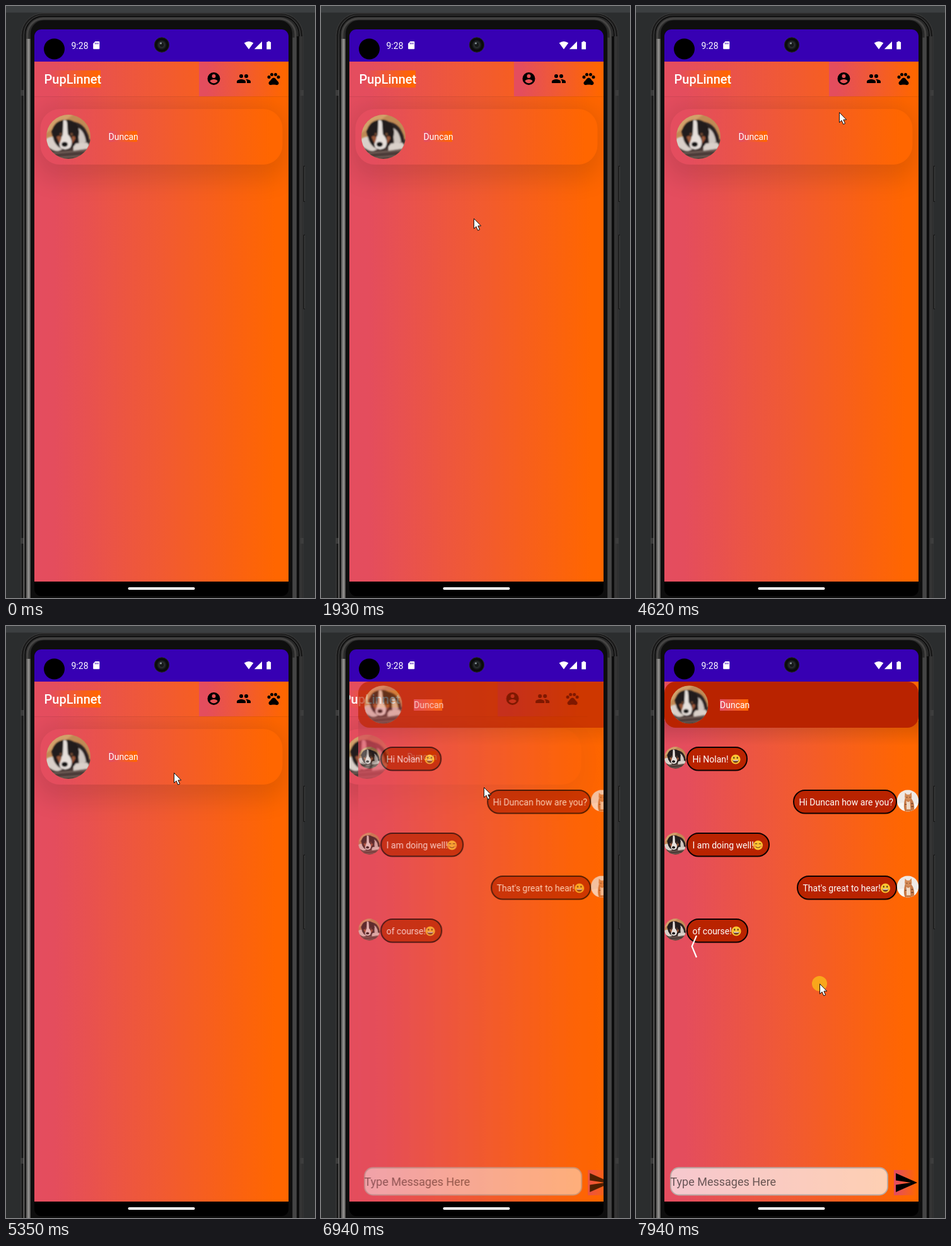
An HTML page that plays this animation: 490x937 px, repeating every 8000 ms.

```html
<!DOCTYPE html>
<html lang="en">
<head>
<meta charset="utf-8">
<title>Pet chat</title>
<style>
  html, body { margin: 0; width: 100%; height: 100%; overflow: hidden; background: #2b2d2e; }
  svg { display: block; width: 100vw; height: 100vh; }
  text { font: 14px Roboto, "Noto Sans", sans-serif; fill: #fff; }
  .title { font-size: 20px; font-weight: 500; }
  .hint { font-size: 18px; fill: rgba(0, 0, 0, .58); }
  .bubble { fill: #b92300; stroke: #0c0000; stroke-width: 2; }
  #list, #chat, #press, #back { animation: 8s linear infinite; }
  #list { animation-name: leave; }
  #chat { animation-name: enter, appear; }
  #press { animation-name: press; animation-timing-function: step-end; }
  #back { animation-name: back; animation-timing-function: step-end; }
  @keyframes leave {
    0%, 85.625% { transform: none; animation-timing-function: cubic-bezier(.3, 0, .8, .15); }
    86.5625% { transform: translateX(-16px); animation-timing-function: cubic-bezier(.05, .7, .1, 1); }
    91.25%, 100% { transform: translateX(-40px); }
  }
  @keyframes enter {
    0%, 85.625% { transform: translateX(40px); animation-timing-function: cubic-bezier(.3, 0, .8, .15); }
    86.5625% { transform: translateX(24px); animation-timing-function: cubic-bezier(.05, .7, .1, 1); }
    91.25%, 100% { transform: none; }
  }
  @keyframes appear {
    0%, 86% { opacity: 0; }
    87.1%, 100% { opacity: 1; }
  }
  @keyframes press {
    0%, 83.45% { opacity: 0; }
    82.57%, 94.15%, 100% { opacity: 1; }
  }
  @keyframes back {
    0% { opacity: 0; }
    96.82%, 100% { opacity: 1; }
  }
</style>
</head>
<body>
<svg viewBox="0 0 490 937" preserveAspectRatio="none">
  <defs>
    <linearGradient id="warm">
      <stop offset="0" stop-color="#e44d5f"/>
      <stop offset=".08" stop-color="#e44d5d"/>
      <stop offset=".5" stop-color="#f15a32"/>
      <stop offset=".95" stop-color="#ff6600"/>
    </linearGradient>
    <linearGradient id="metal" x2="0" y2="1">
      <stop offset="0" stop-color="#3c3c3c"/>
      <stop offset=".15" stop-color="#5c5c5c"/>
      <stop offset="1" stop-color="#8e8c8a"/>
    </linearGradient>
    <linearGradient id="rim">
      <stop offset="0" stop-color="#4c4b4a"/>
      <stop offset=".55" stop-color="#9a9896"/>
      <stop offset="1" stop-color="#4a4948"/>
    </linearGradient>
    <linearGradient id="drop" x2="0" y2="1">
      <stop offset="0" stop-opacity=".17"/>
      <stop offset="1" stop-opacity="0"/>
    </linearGradient>
    <radialGradient id="lens">
      <stop offset="0" stop-color="#50585a"/>
      <stop offset=".5" stop-color="#2c3032"/>
      <stop offset="1" stop-color="#0c0d0e"/>
    </radialGradient>
    <filter id="soft" x="-20%" y="-80%" width="140%" height="260%"><feGaussianBlur stdDeviation="19"/></filter>
    <filter id="photo"><feGaussianBlur stdDeviation="1"/></filter>
    <clipPath id="page"><rect x="45" y="88" width="403" height="823"/></clipPath>
    <clipPath id="glass"><rect x="45" y="37" width="403" height="897" rx="11"/></clipPath>
    <clipPath id="round"><circle r="35"/></clipPath>

    <g id="dog" clip-path="url(#round)">
      <rect x="-35" y="-35" width="70" height="70" fill="#c08a55"/>
      <g filter="url(#photo)">
        <path d="M-38 -38H12L-38 -4Z" fill="#d2a06a"/>
        <path d="M-38 10 38 4V38H-38Z" fill="#4c3b37"/>
        <path d="M-36 27 36 21M-30 34 35 29" stroke="#75625b" stroke-width="2"/>
        <path d="M2 -24Q22 -24 29 -8Q36 4 30 14H2Z" fill="#2c2322"/>
        <path d="M15 -14Q25 -10 28 8L17 14Z" fill="#cfc6c0"/>
        <path d="M-36 4Q-26 -4 -18 4L-8 18Q-16 25 -24 21L-36 14Z" fill="#d9d0c9"/>
        <path d="M8 11 29 9Q36 14 30 19L8 22Z" fill="#d9d0c9"/>
        <path d="M-27 -8Q-22 -27 -4 -27Q14 -27 17 -8Q16 14 -1 21Q-17 20 -23 6Z" fill="#241c1c"/>
        <path d="M-8 -26Q-2 -28 -2 -20L-1 -4Q9 6 3 17Q-5 23 -13 17Q-17 8 -9 -3Z" fill="#e6dfda"/>
        <path d="M-19 0Q-13 -4 -11 2L-14 11ZM5 0Q11 -3 11 3L6 11Z" fill="#9a5738"/>
        <circle cx="-12" cy="-4" r="2.2" fill="#6b4631"/><circle cx="5" cy="-4" r="2.2" fill="#6b4631"/>
        <ellipse cx="-6" cy="12" rx="5" ry="4" fill="#171314"/>
      </g>
    </g>
    <g id="cat" clip-path="url(#round)">
      <rect x="-35" y="-35" width="70" height="70" fill="#efe9e5"/>
      <path d="M-35 10Q0 0 35 12V35H-35Z" fill="#f9f6f3"/>
      <path d="M-9 -8Q-16 20 -9 35H20Q24 8 11 -8Z" fill="#c77a48"/>
      <path d="M-9 -26 -3 -20H5L12 -27 13 -10Q8 0 1 0Q-8 -2 -10 -12Z" fill="#d38a56"/>
      <path d="M-5 0Q2 8 7 0L9 28H-4Z" fill="#f0dac7"/>
      <path d="M-5 -11h4M5 -11h4M-9 12h5M11 9h6M11 19h7" stroke="#754229" stroke-width="3"/>
    </g>
    <g id="smile">
      <circle r="7.6" fill="#fcc532"/>
      <path d="M-4.8 1H4.8Q4.2 5.6 0 5.6Q-4.2 5.6 -4.8 1Z" fill="#6b3a20"/>
      <path d="M-4.3 1.2H4.3L4 2.6H-4Z" fill="#fff"/>
      <ellipse cx="-2.7" cy="-2.4" rx="1.1" ry="1.6" fill="#5b3520"/>
      <ellipse cx="2.7" cy="-2.4" rx="1.1" ry="1.6" fill="#5b3520"/>
    </g>
    <g id="blush">
      <circle r="7.6" fill="#fcc532"/>
      <path d="M-4.8 -1.6Q-3 -4 -1.4 -1.6M1.4 -1.6Q3 -4 4.8 -1.6M-3.6 2.4Q0 5.6 3.6 2.4" fill="none" stroke="#6b3a20" stroke-width="1.1"/>
      <circle cx="-5" cy="1.4" r="1.5" fill="#f58a48"/><circle cx="5" cy="1.4" r="1.5" fill="#f58a48"/>
    </g>
  </defs>

  <!-- phone body -->
  <rect width="490" height="937" fill="#2b2d2e"/>
  <rect width="490" height="10.5" fill="#3c3f41"/>
  <path d="M470 253h4v57h-4zM470 362h4v118h-4z" fill="#131313"/>
  <path d="M473.5 254v55M473.5 363v116" stroke="#444"/>
  <rect x="24" y="11.5" width="447" height="980" rx="35" fill="#1b1b1b" stroke="#3e3e3e"/>
  <rect x="28.5" y="14.5" width="438" height="980" rx="31" fill="#0d0d0d" stroke="url(#metal)" stroke-width="1.2"/>
  <rect x="31" y="17" width="433" height="980" rx="28" fill="#2a2a2a"/>
  <rect x="34" y="20" width="425" height="980" rx="25" fill="none" stroke="#454443" stroke-width="3"/>
  <rect x="32" y="52" width="7" height="885" fill="url(#rim)"/>
  <path d="M457.5 50V937" stroke="#444" stroke-width="6"/>
  <path d="M462.5 48V937" stroke="#0c0c0c" stroke-width="3"/>
  <path d="M467.5 48V937" stroke="#343434" stroke-width="5"/>
  <path d="M23 133h5v9h-5zM467 133h5v9h-5zM23 842h5v9h-5zM467 842h5v9h-5z" fill="#3d3d3d"/>
  <rect x="39" y="22.5" width="415" height="980" rx="21" fill="#0e0e0e"/>

  <g clip-path="url(#glass)">
    <rect x="45" y="37" width="403" height="897" fill="#000"/>
    <rect x="45" y="37" width="403" height="51" fill="#3700b3"/>

    <g clip-path="url(#page)">
      <g id="list">
        <rect x="45" y="88" width="403" height="823" fill="url(#warm)"/>
        <rect x="448" y="88" width="42" height="823" fill="#f60"/>
        <rect x="47" y="160" width="399" height="115" rx="34" opacity=".11" filter="url(#soft)"/>
        <rect x="45" y="88" width="403" height="55" fill="url(#warm)"/>
        <path d="M45 143.5H448" stroke="#000" stroke-opacity=".08"/>
        <rect x="61" y="102" width="89" height="27" fill="url(#warm)"/>
        <text class="title" x="60.5" y="123">PupLinnet</text>
        <rect x="306" y="88" width="142" height="55" fill="url(#warm)"/>
        <g transform="translate(317.5 103)">
          <path fill-rule="evenodd" d="M12 2a10 10 0 1 0 0 20a10 10 0 1 0 0-20zm0 3a3 3 0 1 1 0 6a3 3 0 1 1 0-6zm0 14.2c-2.5 0-4.71-1.28-6-3.22.03-1.99 4-3.08 6-3.08s5.97 1.09 6 3.08c-1.29 1.94-3.5 3.22-6 3.22z"/>
        </g>
        <g transform="translate(365 103)">
          <circle cx="8" cy="8" r="3"/><circle cx="16" cy="8" r="3"/>
          <path d="M8 13c-2.33 0-7 1.17-7 3.5V19h14v-2.5c0-2.33-4.67-3.5-7-3.5zm8 0c-.29 0-.62.02-.97.05 1.16.84 1.97 1.97 1.97 3.45V19h6v-2.5c0-2.33-4.67-3.5-7-3.5z"/>
        </g>
        <g transform="translate(412.5 103)">
          <circle cx="4.5" cy="9.5" r="2.5"/><circle cx="9" cy="5.5" r="2.5"/>
          <circle cx="15" cy="5.5" r="2.5"/><circle cx="19.5" cy="9.5" r="2.5"/>
          <path d="M17.3 14.9L14.9 12Q13.6 10.5 12 10.5T9.1 12L6.7 14.9C5.3 16.2 3.7 17.6 4 19.7Q4.6 21.7 6.4 22C7.1 22.1 9.4 21.5 12 21.5S16.9 22.1 17.6 22Q19.4 21.7 20 19.7C20.3 17.6 18.6 16.2 17.3 14.9Z"/>
        </g>
        <rect x="54.5" y="163" width="384" height="88" rx="31" fill="url(#warm)"/>
        <use href="#dog" transform="translate(99 207)"/>
        <rect x="163" y="198" width="45" height="17" fill="url(#warm)"/>
        <text x="162.5" y="212">Duncan</text>
      </g>

      <g id="chat">
        <rect x="45" y="88" width="403" height="823" fill="url(#warm)"/>
        <rect x="45" y="150" width="403" height="39" fill="url(#drop)"/>
        <rect x="45" y="88" width="403" height="73" rx="18" fill="#b92300"/>
        <use href="#dog" transform="translate(84.5 124.5) scale(.86)"/>
        <rect x="133" y="116" width="45" height="18" fill="url(#warm)"/>
        <text x="133" y="130">Duncan</text>
        <g id="talk"></g>
        <rect x="55" y="857.5" width="344" height="43" rx="13" fill="#fff" fill-opacity=".69" stroke="#b9aaa5" stroke-width="1.8"/>
        <text class="hint" x="54.5" y="885.5">Type Messages Here</text>
        <rect x="409" y="861" width="38" height="40" fill="url(#warm)"/>
        <path d="M412 866 446 881 412 896V884.4L436 881 412 877.6Z"/>
      </g>
    </g>

    <!-- system bars -->
    <circle cx="76.5" cy="68" r="16.5"/>
    <text x="103.5" y="68">9:28</text>
    <path d="M141.5 56H147.3Q148.3 56 148.3 57V67.2Q148.3 68.2 147.3 68.2H139.2Q138.2 68.2 138.2 67.2V59.5Z" fill="#fff"/>
    <path d="M141.6 58v2.5M143.8 58v2.5M146 58v2.5" stroke="#3700b3"/>
    <path d="M377.7 58.6Q385 53.4 392.3 58.6L385 68.4ZM406 56V68.3H393.8ZM415 55.8h3.4v1.3h1.7v11.3h-6.8V57.1h1.7z" fill="#fff"/>
    <circle cx="247" cy="61.5" r="11.7" fill="#0b0b0c" stroke="#26262a"/>
    <circle cx="247" cy="61.5" r="8" fill="url(#lens)"/>
    <circle cx="247" cy="61.5" r="3.4" fill="#151819"/>
    <circle cx="245.5" cy="59" r="1.6" fill="#859094"/>
    <rect x="193.5" y="920" width="106" height="4" rx="2" fill="#fff"/>
    <path id="back" d="M96 490 88.7 507 96 524.5" fill="none" stroke="#fff" stroke-width="2.2"/>
  </g>

  <g id="pointer">
    <circle id="press" r="12" fill="#f9a61b"/>
    <path d="M.5 .5V16.4L4 13 6.7 19.2 9.6 18 6.9 12H11.7Z" fill="#fff" stroke="#111"/>
  </g>
</svg>
<script>
  const LOOP = 8000;

  // left, right, top, text, emoji, emoji centre
  const lines = [
    [80, 177, 191, 'Hi Nolan!', 'smile', 158],
    [249, 414, 259, 'Hi Duncan how are you?'],
    [80, 212, 327, 'I am doing well!', 'blush', 193.5],
    [255, 414, 395, "That's great to hear!", 'smile', 395.5],
    [80, 178, 463, 'of course!', 'smile', 159]
  ];
  document.getElementById('talk').innerHTML = lines.map(([left, right, top, text, face, fx]) => {
    const mine = left > 200;
    return `<use href="#${mine ? 'cat' : 'dog'}" transform="translate(${mine ? 431 : 62.5} ${top + 17.5}) scale(.49)"/>
      <rect class="bubble" x="${left + 1}" y="${top + 1}" width="${right - left - 2}" height="36.5" rx="18"/>
      <text x="${left + 9.5}" y="${top + 25}">${text}</text>` +
      (face ? `<use href="#${face}" transform="translate(${fx} ${top + 20})"/>` : '');
  }).join('');

  // start, end, step count, then [step, x, y] way points
  const moves = [
    [190, 650, 8, [0, 423, 880], [4, 318, 500], [7, 232, 290]],
    [790, 850, 2, [1, 232, 284]],
    [1050, 1790, 12, [4, 231, 218], [6, 219, 143], [9, 245, 330], [11, 258, 439]],
    [1860, 1990, 3, [0, 256, 451], [2, 227, 221]],
    [2190, 2790, 10, [2, 226, 166], [7, 258, 410], [9, 249, 486]],
    [3820, 4150, 6, [4, 344, 135], [5, 341, 111]],
    [4350, 4820, 8, [4, 322, 168], [7, 279, 276]],
    [5080, 5350, 5, [4, 266, 232]],
    [6880, 7670, 13, [4, 245, 290], [9, 52, 550], [10, 50, 558], [12, 100, 562]],
    [7750, 7940, 3, [2, 291, 566]]
  ];

  const frame = (time, x, y, opacity = 1) => ({
    offset: time / LOOP, transform: `translate(${x}px, ${y}px)`, opacity, easing: 'step-end'
  });

  function pointerFrames() {
    let x = 423, y = 880;
    const out = [frame(0, x, y, 0)];
    for (const [start, end, count, ...points] of moves) {
      let step = -1;
      for (const [to, px, py] of points) {
        const span = to - step;
        for (let i = 1; i <= span; i++) {
          const time = start + (end - start) * (step + i) / (count - 1) - 5;
          out.push(frame(time, Math.round(x + (px - x) * i / span), Math.round(y + (py - y) * i / span)));
        }
        [step, x, y] = [to, px, py];
      }
    }
    out.push(frame(LOOP, x, y));
    return out;
  }

  document.getElementById('pointer').animate(pointerFrames(), { duration: LOOP, iterations: Infinity });
</script>
</body>
</html>
```
